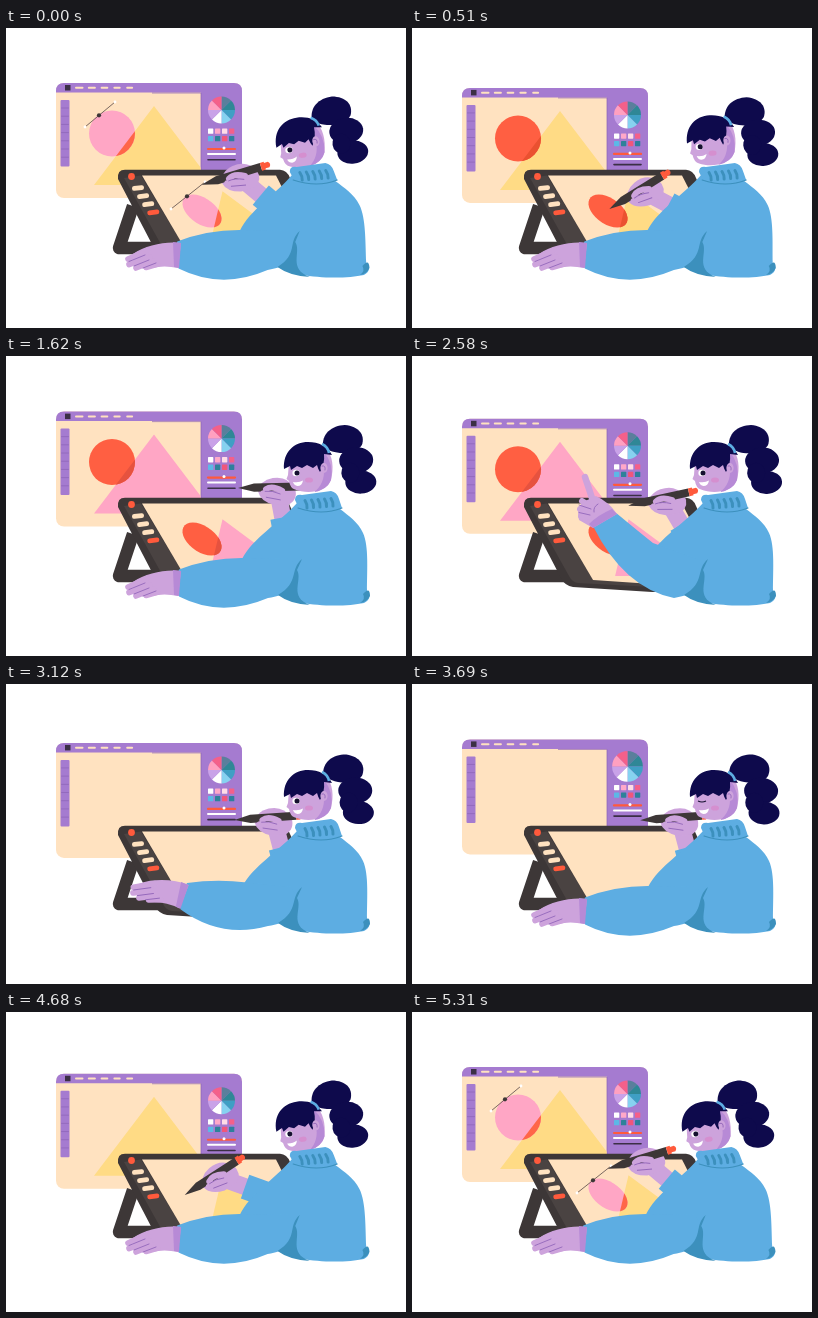
Recreate the animation shown at these times as an HTML page. Size 400 px wide and 300 px high, loop 5.34 s.

```html
<!DOCTYPE html>
<html lang="en">
<head>
<meta charset="utf-8">
<title>Drawing at a pen tablet</title>
<style>
html, body { margin: 0; width: 100%; height: 100%; overflow: hidden; background: #fff; }
svg { display: block; width: 100vw; height: 100vh; }
.skin { fill: #cda3dc; }
.shade { fill: #b78ad6; }
.skinline { fill: none; stroke: #cda3dc; stroke-linecap: round; stroke-linejoin: round; }
.crease { fill: none; stroke: #9468bb; stroke-width: .9; stroke-linecap: round; }
.knit { fill: #5dade2; }
.deep { fill: #3c90bd; }
.fold { fill: none; stroke: #3c90bd; stroke-width: 1.2; stroke-linecap: round; }
.hair { fill: #0e0a4c; }
.dark { fill: #3d3737; }
.cream { fill: #ffe2c0; }
.violet { fill: #a57bd0; }
.red { fill: #ff5a3c; }
</style>
</head>
<body>
<svg id="stage" viewBox="0 0 400 300"></svg>
<script>
const LOOP = 5340, STEP = 30, TURN = 2 * Math.PI;
const YELLOW = '#ffdb85', PINK = '#ffa6c5', RED = '#ff5f42';

// Drawing on the canvas, in monitor coordinates
const DISC = { x: 106, y: 105.5, r: 23 };
const APEX = [148, 78], CORNER = [188, 140], LEFT = [DISC.x - DISC.r, DISC.y];
const RIGHT = [DISC.x + DISC.r, DISC.y], GRAB = [125, 69], MIDDLE = [148, 100];
const TRI = `${APEX} 88,157 208,157`;
const SCREEN = '136,147.5 270,147.5 312,230 240,228 181,224';

const range = n => [...Array(n).keys()];
const lerp = (a, b, p) => a + (b - a) * p;
const mix = (a, b, p) => a.map((v, i) => lerp(v, b[i], p));
const ease = p => p * p * (3 - 2 * p);
const ramp = (t, a, b) => ease(Math.min(1, Math.max(0, (t - a) / (b - a))));
const pulse = (t, a, b, c, d) => ramp(t, a, b) - ramp(t, c, d);
const wave = (t, peak, cycles) => Math.cos((t - peak) / LOOP * cycles * TURN);
const toTablet = ([x, y]) => [.75 * x + .4 * y + 74.3, .717 * y + 107.4];

const rect = (x, y, w, h, fill, r = 0) =>
  `<rect x="${x}" y="${y}" width="${w}" height="${h}" rx="${r}" fill="${fill}"/>`;
const hline = (x1, x2, y, color, w = 2) =>
  `<path d="M${x1} ${y}H${x2}" stroke="${color}" stroke-width="${w}" stroke-linecap="round"/>`;

const disc = (cls, extra = '') =>
  `<circle class="${cls}" cx="${DISC.x}" cy="${DISC.y}" r="${DISC.r}" ${extra}/>`;
const art = `<g class="slide"><polygon class="tri" points="${TRI}"/>
  <g class="circ">${disc('disc')}${disc('mix', 'clip-path="url(#overlap)"')}</g></g>`;

// Tangent line with its anchor near the middle
const handle = (x, y, dx, dy) => `<g class="handle" transform="translate(${x} ${y})">
  <path d="M${-dx} ${dy}L${dx} ${-dy}" stroke="#6b5a55" stroke-width=".9"/>
  <circle cx="${-dx}" cy="${dy}" r="1.4" fill="#fff"/><circle cx="${dx}" cy="${-dy}" r="1.4" fill="#fff"/>
  <circle class="dark" cx="-1" cy=".8" r="2.1"/></g>`;

const spoke = i => [Math.sin(i * TURN / 8) * 13.5, -Math.cos(i * TURN / 8) * 13.5];
const wheel = ['#5a7f9c', '#2f8796', '#3f9fc4', '#86d2f0', '#fff', '#c9a2e8', '#ffa0c0', '#f4608a']
  .map((c, i) => `<path fill="${c}" d="M0 0L${spoke(i)}A13.5 13.5 0 0 1 ${spoke(i + 1)}Z"/>`).join('');

const swatches = ['#fff', '#ffa8c8', '#ffdce6', '#f4608a', '#5cb8e6', '#2d8299', '#f0567a', '#2e7f9c']
  .map((c, i) => rect(202 + i % 4 * 7, i < 4 ? 100.5 : 108, 5.3, 5.3, c, .6)).join('');

const monitor = `<g id="monitor">
  <rect class="cream" x="50" y="55" width="186" height="115" rx="8"/>
  <path class="violet" d="M50 64.5V63Q50 55 58 55H228Q236 55 236 63V162Q236 170 228 170H195V64.5Z"/>
  <path d="M146 65H195V170" fill="none" stroke="#8b63b6" stroke-width=".7"/>
  ${rect(59, 57, 5.5, 5.5, '#3b2f45')}
  ${range(5).map(i => hline(70 + i * 12.8, 76.5 + i * 12.4, 59.8, '#ffe2c0')).join('')}
  ${rect(54.5, 72, 9, 66.5, '#a57bd0', 1)}
  ${range(7).map(i => hline(55.5, 62.5, 80 + i * 8.2, '#8b63b6', .7)).join('')}
  <g id="wheel">${wheel}</g>${swatches}
  ${hline(202, 229, 121, '#ff5a3c', 2.2)}<circle cx="218" cy="120" r="1.5" fill="#fff"/>
  ${hline(202, 229, 126, '#fff', 2)}${hline(202, 229, 131.7, '#3b2f45', 1.6)}
  <g clip-path="url(#canvas)">${art}${handle(94, 86.5, 15, 12.5)}</g>
</g>`;

const pills = range(4).map(i => `<rect class="${i < 3 ? 'cream' : 'red'}" x="-6" y="-2.4" width="12"
  height="4.8" rx="2.2" transform="translate(${132 + i * 5.1} ${160 + i * 8.1}) rotate(-7)"/>`).join('');

const tablet = `
  <path d="M127 178L113 220H154" fill="none" stroke="#3d3737" stroke-width="12.5" stroke-linejoin="round"/>
  <path class="dark" d="M112 151Q111 141.7 119 141.7H274Q281 142 284 150L324 236H240L161 231Q153 230 149 222Z"/>
  <path d="M118 150L135 147.5L181 224L240 228V231L166 227Q160 226 157 220Z" fill="#4a4342"/>
  <polygon class="cream" points="${SCREEN}"/>
  <g clip-path="url(#screen)">
    <g transform="matrix(.75 0 .4 .717 74.3 107.4)">${art}</g>${handle(182, 167.5, 17, 13.5)}
  </g>
  <circle class="red" cx="125.5" cy="148.5" r="3.4"/>${pills}`;

const penArm = `
  <path id="forearm" class="skinline" stroke-width="17"/>
  <path id="sleeve" fill="none" stroke="#5dade2" stroke-width="25"/>
  <g id="grip">
    <path class="skin" d="M20 4Q22 -7 35 -9Q50 -11 57 2Q60 13 50 18L36 18Q22 14 20 4Z"/>
    <path class="dark" d="M0 0L16 -4.2L62 -4V4L16 4.2Z"/>
    <path class="red" d="M62 -4H66V-2.8H70Q73 0 70 2.8H66V4H62Z"/>
    <path class="skinline" stroke-width="6" d="M42 9L25 6M44 4Q34 -2 28 2"/>
    <path class="crease" d="M42 7Q34 3 27 4M42 13L28 10"/>
  </g>`;

const head = `<g id="head">
  <g id="tail" class="hair">
    <path d="M317 92C316 77 327 70 340 70C354 72 360 81 356 91C350 100 334 99 326 96Z"/>
    <ellipse cx="349.5" cy="106" rx="17" ry="13"/>
    <ellipse cx="353" cy="128" rx="15.5" ry="11.5"/>
    <ellipse cx="343" cy="118" rx="9" ry="10"/>
  </g>
  <path class="skin" d="M283 106L282 119L280.5 123L283 125Q284 132 289 133.5C300 138 320 137 325 124C328 112 327 100 320 92L300 92Z"/>
  <path class="shade" d="M318 96Q328 108 325 124Q321 134 308 136Q319 128 318 112Z"/>
  <path class="hair" d="M278 113C277 96 288 86 302 86C313 86 321 90 326 99L318 98Q319 108 314 116Q312 113 311 109L307 112L301 109L296 112L291 110L285 114L284 110Z"/>
  <path d="M316 88Q322 91 323 97" fill="none" stroke="#5dade2" stroke-width="2.6"/>
  <ellipse class="skin" cx="318" cy="112" rx="3.6" ry="5"/>
  <path class="crease" d="M316 110Q320 109 319 114"/>
  <ellipse cx="303" cy="124" rx="4" ry="2.6" fill="#d58fcf"/>
  <g id="open"><ellipse cx="290" cy="117" rx="3.6" ry="3.2" fill="#fff"/>
    <circle cx="291" cy="117" r="2.5" fill="#15102f"/></g>
  <path id="shut" d="M286 117Q290 119 294 117" fill="none" stroke="#15102f" stroke-width="1.2"/>
  <path d="M287 126Q293 127 297 124.5Q296 130 291.5 130Q288 129.5 287 126Z" fill="#fff"/>
</g>`;

const body = `<g id="body">
  <path class="knit" d="M292 146C272 168 247 182 236 203L272 238C286 250 335 252 358 247Q367 242 361 235C361 215 363 190 357 177C352 166 343 160 334 153Z"/>
  <path class="deep" d="M357 238Q364 230 364 240Q361 246 354 247Q360 243 357 238Z"/>
  <path id="arm" class="knit"/>
  <path class="deep" d="M296 203C283 214 294 226 272 239Q284 248 304 249C282 241 297 224 291 214Z"/>
  <path class="knit" d="M289 144Q289 138 296 139L325 135Q331 136 333 143L336 152Q316 160 294 154Z"/>
  <path class="fold" d="M292 152Q316 160 336 152"/>
  ${range(5).map(i => `<path class="fold" style="stroke-width:3" d="M${299 + i * 6.5} ${144.5 - i * .5}q2.5 4 2 7.5"/>`).join('')}
</g>`;

const hands = `
  <g id="flat">
    <path class="skin" d="M175 215C160 213 140 217 127 226L128 238L146 240Q158 237 172 240Z"/>
    <path class="shade" d="M167 214L175 215L173 240L168 239Z"/>
    <path class="skinline" stroke-width="5.6" d="M142 222L122 231M144 229L123 236.5M148 233L130 240M152 236L140 239.5"/>
    <path class="crease" d="M139 227L123 233.5M143 232L128 238M150 235L137 240"/>
  </g>
  <g id="point">
    <path class="skin" d="M181 172L167 164Q164 152 171 146L184 140Q197 146 205 158Z"/>
    <path class="shade" d="M181 172L177 168Q186 159 200 153L205 158Z"/>
    <path class="skinline" stroke-width="6.5" d="M182 148L173 121"/>
    <path class="skinline" stroke-width="6" d="M178 150L170 145M177 156L168 153M177 161L169 160"/>
    <path class="crease" d="M179 153L167 149M178 159L167 156.5M186 148Q181 151 182 156"/>
  </g>`;

const stage = document.getElementById('stage');
stage.innerHTML = `<defs>
    <clipPath id="overlap"><polygon points="${TRI}"/></clipPath>
    <clipPath id="canvas"><rect x="50" y="65" width="144.6" height="105"/></clipPath>
    <clipPath id="screen"><polygon points="${SCREEN}"/></clipPath>
  </defs>` + monitor + tablet + penArm + head + body + hands;

const $ = id => document.getElementById(id);
const each = (cls, name, value) =>
  stage.querySelectorAll('.' + cls).forEach(el => el.setAttribute(name, value));
const move = (id, value) => $(id).setAttribute('transform', value);
const show = (id, on) => $(id).setAttribute('visibility', on ? 'visible' : 'hidden');
const scaleAt = ([x, y], s) => `translate(${x} ${y}) scale(${s}) translate(${-x} ${-y})`;

function drawArt(t) {
  const redraw = t >= 3900;
  const isRed = !redraw && t >= 430, isPink = !redraw && t >= 1260;
  each('tri', 'fill', isPink ? PINK : YELLOW);
  each('disc', 'fill', isRed ? RED : PINK);
  each('mix', 'fill', !isRed ? '#ff6648' : isPink ? '#e6523f' : '#ea5130');
  each('tri', 'transform', scaleAt(APEX, redraw ? ramp(t, 4020, 4400) : 1));
  each('circ', 'transform', scaleAt(LEFT, redraw ? ramp(t, 4720, 5010) : 1));
  each('slide', 'transform', `translate(${redraw ? 0 : -175 * ramp(t, 2650, 3000)} 0)`);
  each('handle', 'visibility', t < 240 || t >= 5100 ? 'visible' : 'hidden');
}

// Point of the drawing that the nib works on
function spot(t) {
  if (t < 900) return mix(GRAB, [DISC.x, DISC.y], ramp(t, 150, 400));
  if (t < 2000) return MIDDLE;
  let p = mix(APEX, CORNER, ramp(t, 4020, 4400));
  p = mix(p, LEFT, ramp(t, 4430, 4650));
  p = mix(p, RIGHT, ramp(t, 4720, 5010));
  return mix(p, GRAB, ramp(t, 5050, 5300));
}

function drawPen(t) {
  const busy = 1 - ramp(t, 450, 850) + pulse(t, 1050, 1250, 1280, 1550) + ramp(t, 3720, 4000);
  const s = wave(t, 1620, 3);
  const [x, y] = mix([224 + 8 * s, 141 - 9 * s], toTablet(spot(t)), busy);
  const a = -17 - .62 * (y - 157), r = a * Math.PI / 180;
  const hand = [x + 40 * Math.cos(r) - 6 * Math.sin(r), y + 40 * Math.sin(r) + 6 * Math.cos(r)];
  const elbow = [282, 190];
  const cuff = mix(hand, elbow, 25 / Math.hypot(hand[0] - elbow[0], hand[1] - elbow[1]));
  move('grip', `translate(${x} ${y}) rotate(${a})`);
  $('forearm').setAttribute('d', `M${elbow}L${hand}`);
  $('sleeve').setAttribute('d', `M${elbow}L${cuff}`);
}

function drawHead(t) {
  const lean = 1 - ramp(t, 250, 700) + ramp(t, 3950, 4400) - .7 * pulse(t, 4720, 4860, 4890, 5150);
  const tilt = -8 * lean, blink = t >= 3630 && t < 3780;
  move('head', `translate(${tilt * .6} ${-tilt * .3}) rotate(${tilt} 308 135)`);
  move('tail', `rotate(${-3 * (1 - lean) * wave(t, 720, 6)} 318 92)`);
  move('body', `translate(0 250) skewX(${-tilt * .35}) translate(0 -250)`);
  show('open', !blink);
  show('shut', blink);
}

function drawFreeArm(t) {
  const up = pulse(t, 2160, 2500, 2860, 3240), sweep = pulse(t, 2620, 2860, 2860, 3100);
  const cx = 173 + 20 * up, cy = 227 - 63 * up, turn = 61 * up;
  const r = turn * Math.PI / 180, nx = 13.5 * Math.sin(r), ny = 13.5 * Math.cos(r);
  $('arm').setAttribute('d', `M${cx + nx} ${cy - ny}Q${205 + 21 * up} ${201 - 26 * up} 241 ${202 - 15 * up}
    L285 203C300 223 288 238 262 242Q${215 - 3 * up} ${262 - 30 * up} ${cx - nx} ${cy + ny}
    Q${cx - 6 * ny / 13.5} ${cy - 6 * nx / 13.5} ${cx + nx} ${cy - ny}Z`);
  show('flat', up < .5);
  show('point', up >= .5);
  move('flat', `translate(${cx - 173} ${cy - 227}) rotate(${turn} 173 227)`);
  move('point', `translate(${cx - 193} ${cy - 164}) rotate(${turn - 61 - 14 * sweep} 193 164)`);
}

function draw(t) {
  move('monitor', `translate(0 ${4 - 4 * wave(t, 0, 3)})`);
  move('wheel', `translate(215.5 82) scale(${1 + .14 * pulse(t, 3300, 3600, 3750, 4000)})`);
  drawArt(t);
  drawPen(t);
  drawHead(t);
  drawFreeArm(t);
}

function frame() {
  draw(Math.floor(performance.now() % LOOP / STEP) * STEP);
  requestAnimationFrame(frame);
}
frame();
</script>
</body>
</html>
```
